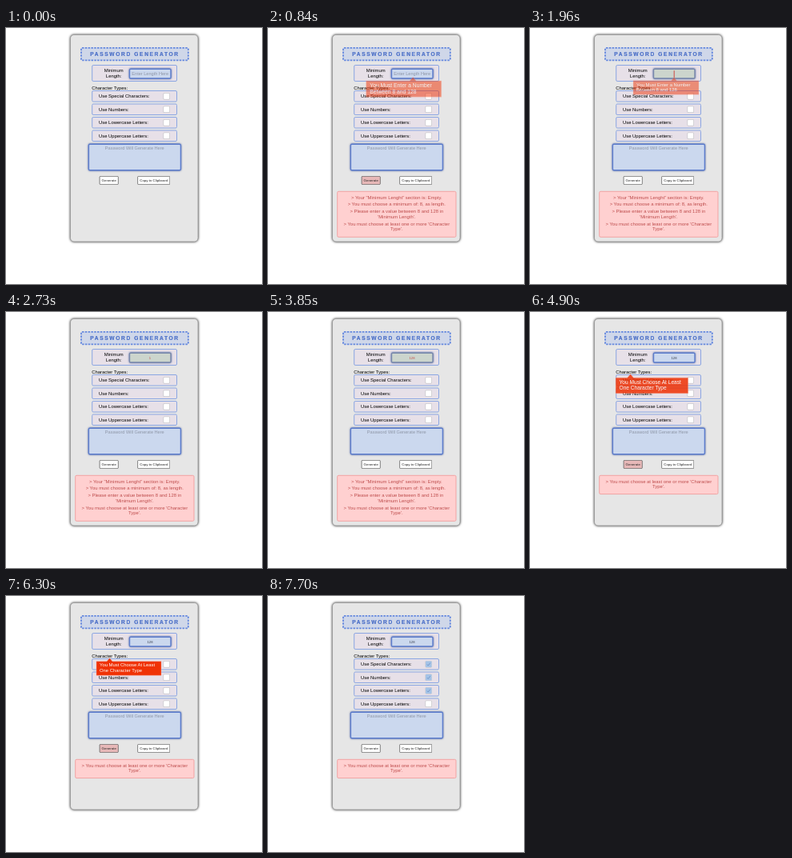
Animation of 320x320 px, one loop 8 s. Source, as an HTML page:

```html
<!DOCTYPE html>
<html lang="en">
<head>
<meta charset="utf-8">
<title>Password generator</title>
<style>
  html, body { margin: 0; width: 100%; height: 100%; overflow: hidden; background: #fff; }
  svg { display: block; width: 100%; height: 100%; font: 5.9px "Liberation Sans", Arial, sans-serif; }
  .card { fill: #e6e6e6; stroke: #999; stroke-width: .8; filter: drop-shadow(0 .4px 1.6px #333); }
  .heading { fill: #cfd7e9; stroke: #6689de; stroke-width: 1.8; stroke-dasharray: 2.5 1.3; }
  .title { font-weight: bold; font-size: 6.6px; letter-spacing: 1.65px; fill: #587bd0; filter: drop-shadow(.3px .4px .4px #5b76b8); }
  .row { fill: #e7e0e8; stroke: #8ba6e2; stroke-width: 1; }
  .field { fill: #cbd8ee; stroke: #5c7ccc; stroke-width: 1.4; filter: drop-shadow(0 0 1px #5268a0); }
  .hint { font-size: 5.62px; fill: #8d95a6; }
  .button { fill: #fff; stroke: #777; stroke-width: .6; filter: drop-shadow(.5px .6px .5px #444); }
  .label { font-size: 4.4px; fill: #222; }
  .box { fill: #fff; stroke: #d0d0d4; stroke-width: .4; filter: drop-shadow(.2px .3px .4px #999); }
  .tick { fill: none; stroke: #6b91c4; stroke-width: .8; }
  .panel { fill: #ffd0d0; stroke: #f2a3a3; stroke-width: 1; }
  .error { fill: #bd4c4c; }
  .tip path { fill: #f03205; stroke: #f7a08c; stroke-width: .4; }
  .tip text { fill: #fff; }
  .middle { text-anchor: middle; }
</style>
</head>
<body>
<svg id="stage" viewBox="0 0 320 320"></svg>
<script>
const LOOP = 8000;
const stage = document.getElementById('stage');

const rect = (cls, x, y, w, h, r = 1.5, id = '') =>
  `<rect class="${cls}" id="${id}" x="${x}" y="${y}" width="${w}" height="${h}" rx="${r}"/>`;
const text = (cls, x, y, str, id = '') => `<text class="${cls}" id="${id}" x="${x}" y="${y}">${str}</text>`;

const option = (name, i) => {
  const y = 78.5 + i * 16.5;
  return rect('row', 107.7, y, 105.8, 13.5) + text('', 116, y + 8.7, `Use ${name}:`) +
    rect('box', 197, y + 3.1, 7.5, 7.5, .8) +
    `<g id="check${i}">${rect('', 197, y + 3.1, 7.5, 7.5, .8).replace('/>', ' fill="#a4c3e7"/>')}
     <path class="tick" d="M198.8 ${y + 7} l1.4 1.5 2.6 -3.4"/></g>`;
};

const panel = (id, height, lines) => `<g id="${id}">${rect('panel', 86.7, 204.3, 148.3, height)}${
  lines.map(([y, str]) => text('error middle', 160.8, y, str)).join('')}</g>`;

const tip = (id, x, y, w, arrowX, lines) => `<g class="tip" id="${id}">
  <path d="M${x} ${y} H${arrowX - 3.5} l3.5 -4 3.5 4 H${x + w} v17.5 h${-w} Z" stroke-linejoin="round"/>
  ${lines.map((str, i) => text('', x + 4, y + 6.7 + i * 6.9, str)).join('')}</g>`;

const choose = "&gt; You must choose at least one or more 'Character";

stage.innerHTML =
  rect('card', 80.5, 8.5, 159.5, 258.5, 4.5) +
  rect('heading', 94, 24.8, 133.8, 15.6, 1) +
  text('title', 105.3, 34.8, 'PASSWORD GENERATOR') +
  rect('row', 107.7, 46.5, 105.8, 20) +
  text('middle', 134.7, 54.8, 'Minimum') + text('middle', 134.7, 61.5, 'Length:') +
  rect('field', 154.5, 51.2, 51.5, 11.8, 1.2, 'input') +
  text('hint middle', 180.2, 59.2, 'Enter Length Here', 'placeholder') +
  '<text class="middle" id="value" x="180" y="59" font-size="4.2"></text>' +
  '<path id="caret" d="M0 53.2 V62" stroke="#d23c35" stroke-width=".9"/>' +
  text('', 107.3, 76.5, 'Character Types:') +
  ['Special Characters', 'Numbers', 'Lowercase Letters', 'Uppercase Letters'].map(option).join('') +
  rect('field', 103.4, 145.2, 115, 32.6) +
  text('hint middle', 160.8, 152.4, 'Password Will Generate Here') +
  rect('button', 117.2, 185.4, 23, 10.2, 1, 'generate') + text('label middle', 128.7, 192, 'Generate') +
  rect('button', 164.7, 185.4, 40, 10.2, 1) + text('label middle', 184.8, 192, 'Copy to Clipboard') +
  panel('allErrors', 57, [
    [213.8, '&gt; Your "Minimum Lenght" section is: Empty.'],
    [222, '&gt; You must choose a minimum of: 8, as length.'],
    [231.4, '&gt; Please enter a value between 8 and 128 in'],
    [238, "'Minimum Length'."],
    [246.6, choose], [253.2, "Type'."]]) +
  panel('typeError', 23.3, [[213.8, choose], [220.3, "Type'."]]) +
  tip('lengthTip', 129, 65.8, 82, 180, ['You Must Enter a Number', 'Between 8 and 128']) +
  tip('typeTip', 113, 81.7, 81, 129.5, ['You Must Choose At Least', 'One Character Type']);

const el = id => document.getElementById(id);
const ramp = (t, from, to) => {
  const p = Math.min(1, Math.max(0, (t - from) / (to - from)));
  return p * p * (3 - 2 * p);
};
const pulse = (t, inFrom, inTo, outFrom, outTo) => ramp(t, inFrom, inTo) - ramp(t, outFrom, outTo);
const mix = (a, b, p) => `rgb(${a.map((v, i) => Math.round(v + (b[i] - v) * p))})`;
const within = (t, from, to) => t >= from && t < to;
const show = (id, opacity) => { el(id).style.opacity = +opacity; };

function popTip(id, t, start, end, originX, originY) {
  show(id, pulse(t, start - 40, start + 120, end, end + 280));
  const scale = 1 + .16 * (1 - ramp(t, start, start + 240));
  el(id).setAttribute('transform',
    `translate(${originX} ${originY}) scale(${scale}) translate(${-originX} ${-originY})`);
}

function draw(t) {
  const focus = pulse(t, 850, 1500, 3960, 4340);
  el('input').style.fill = mix([203, 216, 238], [204, 213, 205], focus);
  el('input').style.stroke = mix([92, 124, 204], [119, 135, 170], focus);
  show('placeholder', t < 2660 ? 1 - ramp(t, 950, 1540) : 0);

  const typed = [2660, 2800, 2940].filter(at => t >= at).length;
  el('value').textContent = '128'.slice(0, typed);
  el('value').style.fill = mix([50, 55, 70], [196, 74, 68], focus);
  show('caret', within(t, 900, 3990) && (t - 900) % 1000 < 500);
  el('caret').setAttribute('transform', `translate(${180.2 + typed * 1.2} 0)`);

  const hover = Math.max(pulse(t, 490, 630, 1610, 1750), pulse(t, 4450, 4570, 6370, 6510));
  el('generate').style.fill = mix([255, 255, 255], [231, 184, 184], hover);

  show('allErrors', within(t, 770, 4760));
  show('typeError', t >= 4760);
  popTip('lengthTip', t, 800, 1820, 172, 64);
  popTip('typeTip', t, 4820, 6370, 163, 78);

  [6650, 7060, 7620].forEach((at, i) => show('check' + i, ramp(t, at, at + 80)));
  show('check3', 0);
}

const start = performance.now();
(function frame() {
  draw((performance.now() - start) % LOOP);
  requestAnimationFrame(frame);
})();
</script>
</body>
</html>
```
